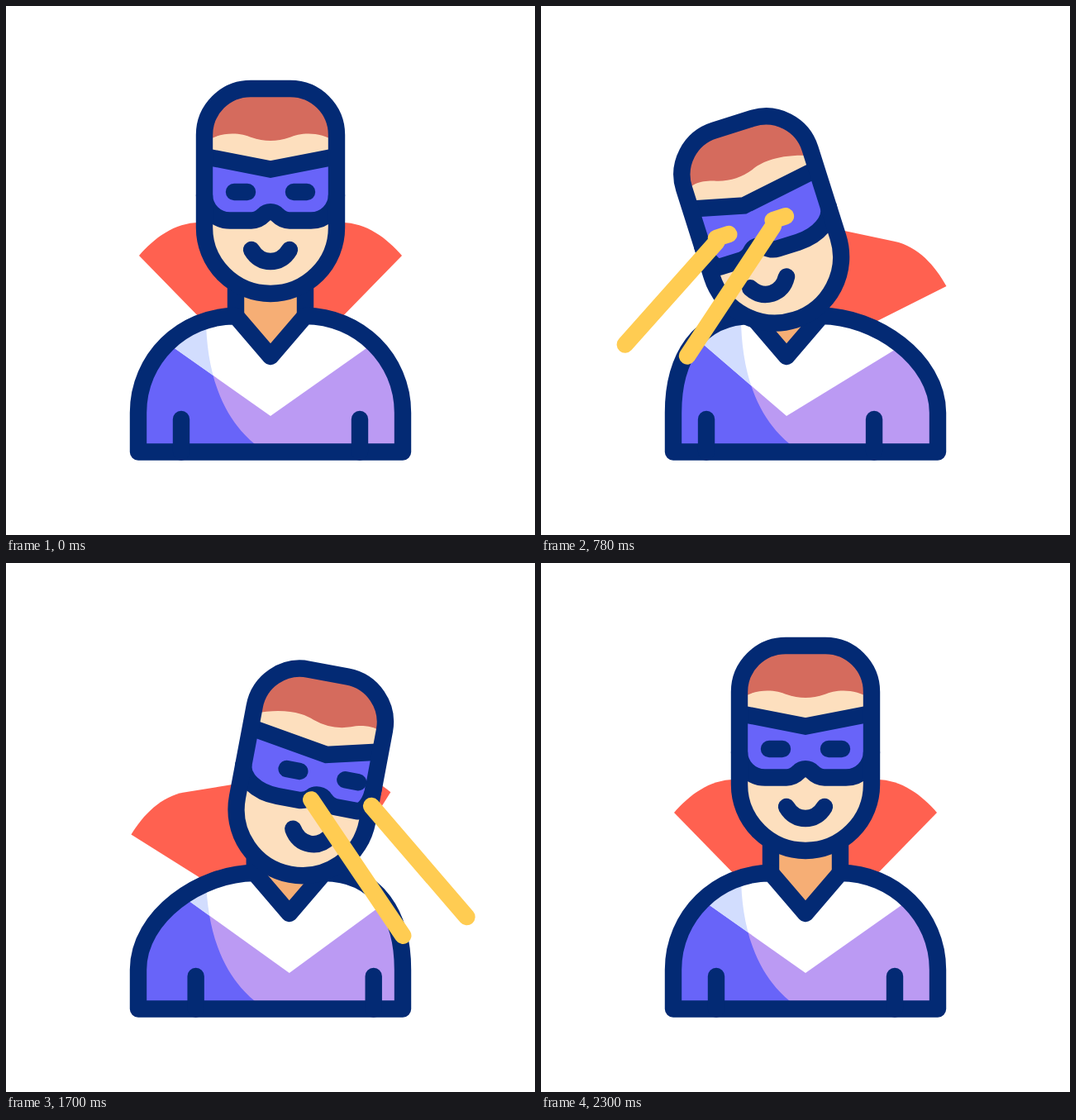
Write an HTML page that moves like this. It is 640 by 640 pixels and loops after 2.4 s.

```html
<!DOCTYPE html>
<html lang="en">
<head>
<meta charset="utf-8">
<title>Masked hero</title>
<style>
  html, body { margin: 0; width: 100%; height: 100%; overflow: hidden; background: #fff; }
  svg { display: block; width: 100vw; height: 100vh; }
  .line { fill: none; stroke: #032a74; stroke-width: 20.4; stroke-linejoin: round; }
  .round { stroke-linecap: round; }
  .beam { stroke: #ffcc52; }
</style>
</head>
<body>
<svg viewBox="0 0 640 640">
  <defs>
    <path id="skull" d="M-80 0V-112A56 56 0 0 1 -24 -168H24A56 56 0 0 1 80 -112V0A80 80 0 0 1 -80 0Z"/>
    <clipPath id="skullClip"><use href="#skull"/></clipPath>
    <clipPath id="torsoClip"><path id="torsoShape"/></clipPath>
    <clipPath id="shadeClip"><path d="M140 360H242C240 430 255 492 301 530V560H140Z"/></clipPath>
  </defs>

  <path id="cape" fill="#ff6150"/>
  <g id="neck">
    <path d="M278 335H362V375L320 424L278 375Z" fill="#f6ae75"/>
    <path id="neckSides" class="line"/>
  </g>

  <g clip-path="url(#torsoClip)">
    <path d="M140 360H500V560H140Z" fill="#bb9af3"/>
    <path d="M140 360H500V560H140Z" fill="#6864f9" clip-path="url(#shadeClip)"/>
    <path id="chest" fill="#fff"/>
    <g clip-path="url(#shadeClip)"><path id="chestShade" fill="#d2ddfe"/></g>
  </g>
  <path id="torso" class="line"/>
  <path id="arms" class="line round"/>

  <g id="head">
    <use href="#skull" fill="#fddfbe"/>
    <g clip-path="url(#skullClip)">
      <path id="hair" fill="#d56b5d"/>
      <path id="mask" fill="#6864f9"/>
    </g>
    <path id="maskTop" class="line" style="stroke-linejoin:miter"/>
    <path id="maskBottom" class="line"/>
    <use href="#skull" class="line"/>
    <g id="face">
      <path class="line round" d="M-23 27C-17 37 -9 41 0 41S17 37 23 27"/>
      <path id="eyes" class="line round" d="M-44 -43h16M28 -43h16"/>
    </g>
  </g>
  <path id="beams" class="line round beam"/>
</svg>

<script>
const LOOP = 2400;
const $ = id => document.getElementById(id);
const draw = (id, d) => $(id).setAttribute('d', d);
const place = (id, v) => $(id).setAttribute('transform', v);
const clamp = u => Math.min(1, Math.max(0, u));
const span = (t, from, to) => clamp((t - from) / (to - from));
const ease = (t, from, to) => {
  const u = span(t, from, to);
  return u * u * (3 - 2 * u);
};

// One volley per side: start time and two rays x1, y1, x2, y2
const volleys = [
  { at: 490, rays: [[219, 278, 32, 488], [287, 257, 111.5, 522.7]] },
  { at: 1347, rays: [[346, 252, 529, 523], [418, 266, 608, 487]] }
];

function drawBeams(t) {
  let d = '', glow = false;
  for (const { at, rays } of volleys) {
    const s = t - at;
    const front = Math.sin(span(s, 0, 675) * Math.PI / 2);
    const back = ease(s, 227, 797);
    if (s > 0 && s < 325) glow = true;
    if (front - back < 0.002) continue;
    for (const [x1, y1, x2, y2] of rays) {
      const point = u => `${x1 + (x2 - x1) * u} ${y1 + (y2 - y1) * u}`;
      d += `M${point(back)}L${point(front)}`;
    }
  }
  draw('beams', d);
  $('eyes').classList.toggle('beam', glow);
}

function drawCape(angle, drop) {
  const a = angle * Math.PI / 180, c = Math.cos(a), s = Math.sin(a);
  const p = (x, y) => `${320 + x * c - y * s} ${374 + drop + x * s + y * c} `;
  draw('cape', `M243 386L${p(-159, -72)}C${p(-141, -93)}${p(-116, -112)}${p(-86, -112)}` +
    `L${p(86, -112)}C${p(116, -112)}${p(141, -93)}${p(159, -72)}L397 386Z`);
}

function drawTorso(shift, armL, armR, chestL, chestR) {
  const l = 278 + shift, r = 362 + shift, mid = 320 + shift;
  const body = `M160 539.5V492C160 427 ${l - 65} 375 ${l} 375L${mid} 424L${r} 375` +
    `C${r + 65} 375 480 427 480 492V539.5Z`;
  draw('torso', body);
  draw('torsoShape', body);
  const vee = `M${184 + chestL} 360V400L${mid} 496L${456 + chestR} 400V360Z`;
  draw('chest', vee);
  draw('chestShade', vee);
  draw('arms', `M${212 + armL} 500V539.5M${428 + armR} 500V539.5`);
  place('neck', `translate(${shift} 0)`);
}

function drawHead(x, y, angle, turn, lift) {
  place('head', `translate(${x} ${y}) rotate(${angle})`);
  place('face', `translate(${turn} ${lift})`);
  const X = v => v + turn, Y = v => v + lift;
  draw('hair', `M-80 -103C${X(-58)} -118 ${X(-35)} -114 ${X(-23)} -109Q${X(0)} -101 ${X(23)} -109` +
    `C${X(35)} -114 ${X(58)} -118 80 -103V-180H-80Z`);
  const top = `M-80 -86L${X(0)} -70.5L80 -86`;
  const bottom = `80 ${Y(-39.5)}A${31 - turn} 31 0 0 1 ${X(49)} ${Y(-8.5)}H${X(23)}` +
    `C${X(16)} ${Y(-8.5)} ${X(12)} ${Y(-11.5)} ${X(8)} ${Y(-15.5)}` +
    `C${X(4)} ${Y(-20)} ${X(-4)} ${Y(-20)} ${X(-8)} ${Y(-15.5)}` +
    `C${X(-12)} ${Y(-11.5)} ${X(-16)} ${Y(-8.5)} ${X(-23)} ${Y(-8.5)}` +
    `H${X(-49)}A${31 + turn} 31 0 0 1 -80 ${Y(-39.5)}`;
  draw('maskTop', top);
  draw('maskBottom', 'M' + bottom);
  draw('mask', `${top}L${bottom}Z`);
}

function render(now) {
  const t = now % LOOP;
  const swing = ease(t, 767, 1437);
  const left = ease(t, 0, 667) - swing;
  const right = swing - ease(t, 1592, 2260);
  // Offset from the rest pose, given the full left and full right values
  const mix = (l, r) => l * left + r * right;

  drawCape(mix(12, -10), mix(2.5, 0));
  draw('neckSides', `M278 ${338 + mix(7, 7)}V375M362 ${338 + mix(7, 7)}V375`);
  drawTorso(mix(-23, 24.5), mix(-12, 19), mix(-25, 18), mix(1.5, 27), mix(-2, 19));
  drawHead(320 + mix(-37, 41.5), 268 + mix(35.5, 32.5), mix(-17.6, 11.5), mix(-17, 17.5), mix(0, -2));
  drawBeams(t);
  requestAnimationFrame(render);
}
render(0);
</script>
</body>
</html>
```
